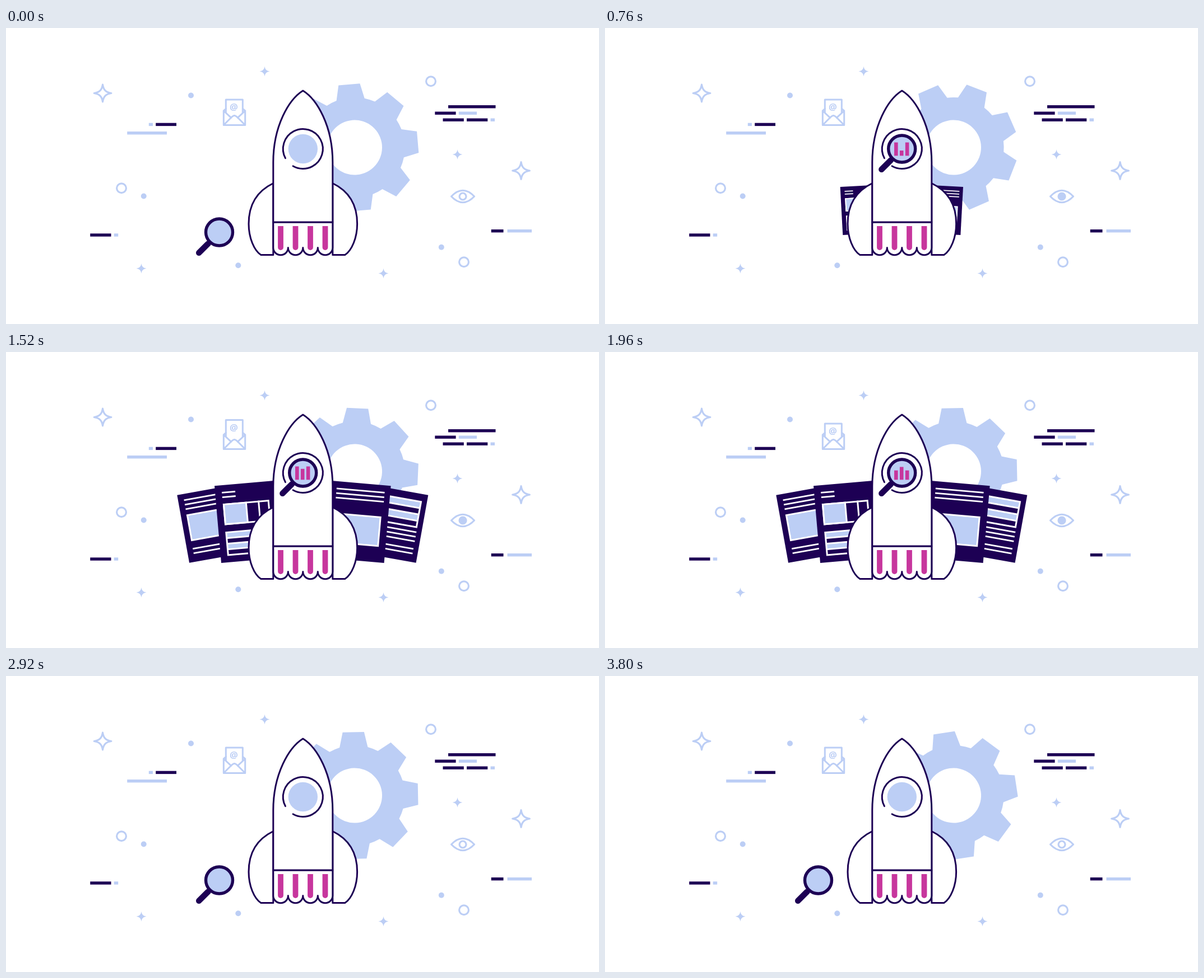
These frames come from a looping animation (1058x529 px, 3840 ms). An HTML page with a canvas:

```html
<!DOCTYPE html>
<html lang="en">
<head>
<meta charset="utf-8">
<title>Rocket launch</title>
<style>
html, body { margin: 0; width: 100%; height: 100%; overflow: hidden; background: #fff; }
canvas { display: block; width: 1058px; height: 529px; }
</style>
</head>
<body>
<canvas id="stage"></canvas>
<script>
const W = 1058, H = 529, LOOP = 3840, TAU = Math.PI * 2, RAD = Math.PI / 180;
const DARK = '#1d0054', LIGHT = '#bccef5', PINK = '#c7369d', WHITE = '#fff';
const LINE = 3, PITCH = 8.2, AXIS = 529.6;
const canvas = document.getElementById('stage');
const dpr = window.devicePixelRatio || 1;
canvas.width = W * dpr;
canvas.height = H * dpr;
const c = canvas.getContext('2d');

const clamp = v => Math.max(0, Math.min(1, v));
const ease = v => 0.5 - 0.5 * Math.cos(Math.PI * clamp(v));
// Rises from time `on` and falls from time `off`
const pulse = (t, on, rise, off, fall) => ease((t - on) / rise) - ease((t - off) / fall);

function rect(color, x, y, w, h) {
  c.fillStyle = color;
  c.fillRect(x, y, w, h);
}
function fill(color, path) {
  c.fillStyle = color;
  c.fill(path);
}
function stroke(color, width, path) {
  c.strokeStyle = color;
  c.lineWidth = width;
  c.stroke(path);
}
function circle(x, y, r) {
  const p = new Path2D();
  p.arc(x, y, r, 0, TAU);
  return p;
}
// Draws in a moved, turned and scaled coordinate system
function place(x, y, paint, turn = 0, sx = 1, sy = sx) {
  c.save();
  c.translate(x, y);
  c.rotate(turn);
  c.scale(sx, sy);
  paint();
  c.restore();
}

function star(r) {
  const p = new Path2D(), near = r * 0.1, far = r * 0.37;
  p.moveTo(0, -r);
  p.bezierCurveTo(near, -far, far, -near, r, 0);
  p.bezierCurveTo(far, near, near, far, 0, r);
  p.bezierCurveTo(-near, far, -far, near, -r, 0);
  p.bezierCurveTo(-far, -near, -near, -far, 0, -r);
  p.closePath();
  return p;
}
const sparkle = (x, y) => place(x, y, () => stroke(LIGHT, 3.2, star(15.3)));
const glint = (x, y) => place(x, y, () => fill(LIGHT, star(9)));
const ring = (x, y) => stroke(LIGHT, 3.2, circle(x, y, 8.4));
const dot = (x, y) => fill(LIGHT, circle(x, y, 5));

// A row of dashes; negative lengths are light
function dashes(x, y, ...lengths) {
  for (const n of lengths) {
    rect(n < 0 ? LIGHT : DARK, x, y, Math.abs(n), 5.4);
    x += Math.abs(n) + 5.2;
  }
}

function drawBackdrop() {
  sparkle(172.5, 116.5);
  sparkle(919, 255);
  glint(461.5, 77.5);
  glint(241.5, 429.7);
  glint(805.5, 226);
  glint(673.5, 438.5);
  ring(758, 95.3);
  ring(206, 286.2);
  ring(817, 418.2);
  dot(330, 120.5);
  dot(245.7, 300.5);
  dot(414.3, 424.2);
  dot(776.8, 391.7);
  dashes(254.8, 169.7, -7.2, 36.8);
  dashes(216.2, 185, -70.8);
  dashes(789, 138, 84.5);
  dashes(765.3, 149.5, 37.3, -32.2);
  dashes(779.5, 161.5, 37.3, 37.3, -7.5);
  dashes(150.2, 367.3, 37.3, -7.5);
  dashes(865.7, 360, 21.8);
  dashes(894.5, 360, -43.5);
}

function drawEye(t) {
  place(815, 301, () => {
    stroke(LIGHT, 3.2, new Path2D('M-20.5 0 Q0 -21.5 20.5 0 Q0 21.5 -20.5 0Z'));
    stroke(LIGHT, 3.2, circle(0, 0, 6));
    c.globalAlpha = pulse(t, 160, 260, 2120, 220);
    fill(LIGHT, circle(0, 0, 5.5));
  });
}

function drawMail(t) {
  const lift = 6.5 * pulse(t, 1240, 260, 1700, 260);
  place(407.3, 128 - lift, () => {
    stroke(LIGHT, LINE, new Path2D('M-15 32 V0 H15 V32'));
    c.fillStyle = LIGHT;
    c.font = '700 16.5px "Open Sans", sans-serif';
    c.textAlign = 'center';
    c.fillText('@', -0.9, 19.2);
  });
  // One half of the envelope, mirrored
  const half = 'M-15 -3.7 L-19.2 0 V25.5 H0 M-19.2 0 L-5.8 12.4 M-18.7 25 L-4.5 10.8 Q-2 8.5 0 8.5';
  place(407.5, 148, () => fill(WHITE, new Path2D('M-19.2 0 L-5 12 L0 8 L5 12 L19.2 0 V25.5 H-19.2Z')));
  for (const side of [-1, 1])
    place(407.5, 148, () => stroke(LIGHT, LINE, new Path2D(half)), 0, side, 1);
}

function drawGear(t) {
  const p = new Path2D(), outer = 114.7, inner = 89.6, tip = 9.6 * RAD, root = 16.3 * RAD;
  for (let a = 0; a < TAU - 0.01; a += TAU / 8) {
    p.arc(0, 0, inner, a - TAU / 8 + root, a - root);
    for (const b of [a - tip, a + tip]) p.lineTo(outer * Math.cos(b), outer * Math.sin(b));
  }
  p.closePath();
  place(622, 213.5, () => {
    fill(LIGHT, p);
    fill(WHITE, circle(0, 0, 49));
  }, TAU * t / LOOP - 5 * RAD);
}

// Page parts; the outer top corner of a page is its origin
function lines(x, y, w, count) {
  for (let i = 0; i < count; i++) rect(WHITE, x, y + i * PITCH - 1.4, w, 2.8);
}
function panel(x, y, w, h, color) {
  rect(WHITE, x, y, w, h);
  rect(color, x + LINE, y + LINE, w - 2 * LINE, h - 2 * LINE);
}
function stripes(x, y, w, h) {
  const step = (h - LINE) / 4;
  panel(x, y, w, h, WHITE);
  for (let i = 0; i < 4; i++)
    rect(i % 2 ? DARK : LIGHT, x + LINE, y + LINE + i * step, w - 2 * LINE, step - LINE);
}

function frontLeft() {
  lines(12, 13.2, 24, 2);
  panel(12, 33, 83, 38.5, DARK);
  panel(12, 33, 43, 38.5, LIGHT);
  rect(WHITE, 74.4, 33, LINE, 38);
  stripes(12, 83.2, 84, 43.5);
}
function frontRight() {
  lines(-96, 13, 86, 3);
  panel(-96, 56, 84, 54.5, LIGHT);
}
function backLeft() {
  lines(10.5, 11, 80, 3);
  panel(10, 37, 80, 48.5, LIGHT);
  lines(10.5, 99.3, 80, 2);
}
function backRight() {
  stripes(-90, 12.5, 81, 49);
  lines(-89, 69, 80, 3);
  lines(-89, 99.3, 80, 2);
}

// Unfolds a page from its pivot, growing and tilting outwards
function drawPage(s, side, page, content) {
  if (s < 0.02) return;
  const { pivot, corner, size, tilt } = page;
  const angle = side * tilt * RAD;
  place(529.3 + side * (529.3 - pivot[0]), pivot[1], () => {
    place(side * (pivot[0] - corner[0]), corner[1] - pivot[1], () => {
      rect(DARK, side > 0 ? -size[0] : 0, 0, ...size);
      content();
    }, angle);
  }, angle * (s - 1), s);
}

const back = { pivot: [421, 360], corner: [305.3, 255.8], size: [100, 123], tilt: 10.2 };
const front = { pivot: [491, 364], corner: [372, 239.3], size: [112, 138.3], tilt: 5 };

function drawPages(t) {
  const backSize = pulse(t, 810, 460, 2440, 360);
  const frontSize = pulse(t, 495, 460, 2710, 360);
  drawPage(backSize, -1, back, backLeft);
  drawPage(backSize, 1, back, backRight);
  drawPage(frontSize, -1, front, frontLeft);
  drawPage(frontSize, 1, front, frontRight);
}

const wing = new Path2D('M-53 277.5 C-81 291 -96.8 314 -96.8 350 C-96.8 375 -87 398 -75 405.5 H-53Z');
const body = new Path2D('M0 112 C-25 127.5 -53 175 -53 240 V347 H53 V240 C53 175 25 127.5 0 112Z');
const skirt = new Path2D('M-53 347 V392.5' + ' a13.25 13.25 0 0 0 26.5 0'.repeat(4) + ' V347Z');

function drawRocket() {
  const part = path => {
    fill(WHITE, path);
    stroke(DARK, LINE, path);
  };
  for (const side of [1, -1]) place(AXIS + 0.2, 0, () => part(wing), 0, side, 1);
  place(AXIS + 0.2, 0, () => {
    part(skirt);
    part(body);
    for (let x = -44.7; x < 40; x += 26.5) {
      const bar = new Path2D();
      bar.roundRect(x, 354, 9.8, 43, [0, 0, 4.9, 4.9]);
      fill(PINK, bar);
    }
    const rim = new Path2D();
    rim.arc(0, 216, 35.5, 152 * RAD, 480 * RAD);
    stroke(DARK, LINE, rim);
    fill(LIGHT, circle(0, 216, 26.2));
  });
}

function drawLens(t) {
  const k = pulse(t, 0, 480, 2220, 440);
  place(380.5 + 149.2 * k, 365 - 149 * k, () => {
    stroke(DARK, 8, new Path2D('M-17 17 L-28 28'));
    stroke(DARK, 10.5, new Path2D('M-20 20.5 L-36.3 36.8'));
    fill(LIGHT, circle(0, 0, 24));
    stroke(DARK, 5.4, circle(0, 0, 24));
  });
}

// Bars sway against each other; the middle one comes and goes later
function drawChart(t) {
  const sway = Math.cos(TAU * t / 760);
  for (let i = 0; i < 3; i++) {
    const middle = i === 1, delay = middle ? 135 : 0;
    const size = pulse(t, 500 + delay, 260, 2291 + delay, 300);
    const h = size * (middle ? 21.3 - 1.8 * sway : 20 + 3.8 * sway);
    if (h > 0.01) rect(PINK, 516 + i * 9.9, 228.3 - h, 6.6, h);
  }
}

function draw(t) {
  c.setTransform(dpr, 0, 0, dpr, 0, 0);
  c.lineCap = c.lineJoin = 'round';
  rect(WHITE, 0, 0, W, H);
  drawBackdrop();
  drawEye(t);
  drawMail(t);
  drawGear(t);
  drawPages(t);
  drawRocket();
  drawLens(t);
  drawChart(t);
}

const start = performance.now();
function frame() {
  draw((performance.now() - start) % LOOP);
  requestAnimationFrame(frame);
}
frame();
</script>
</body>
</html>
```
